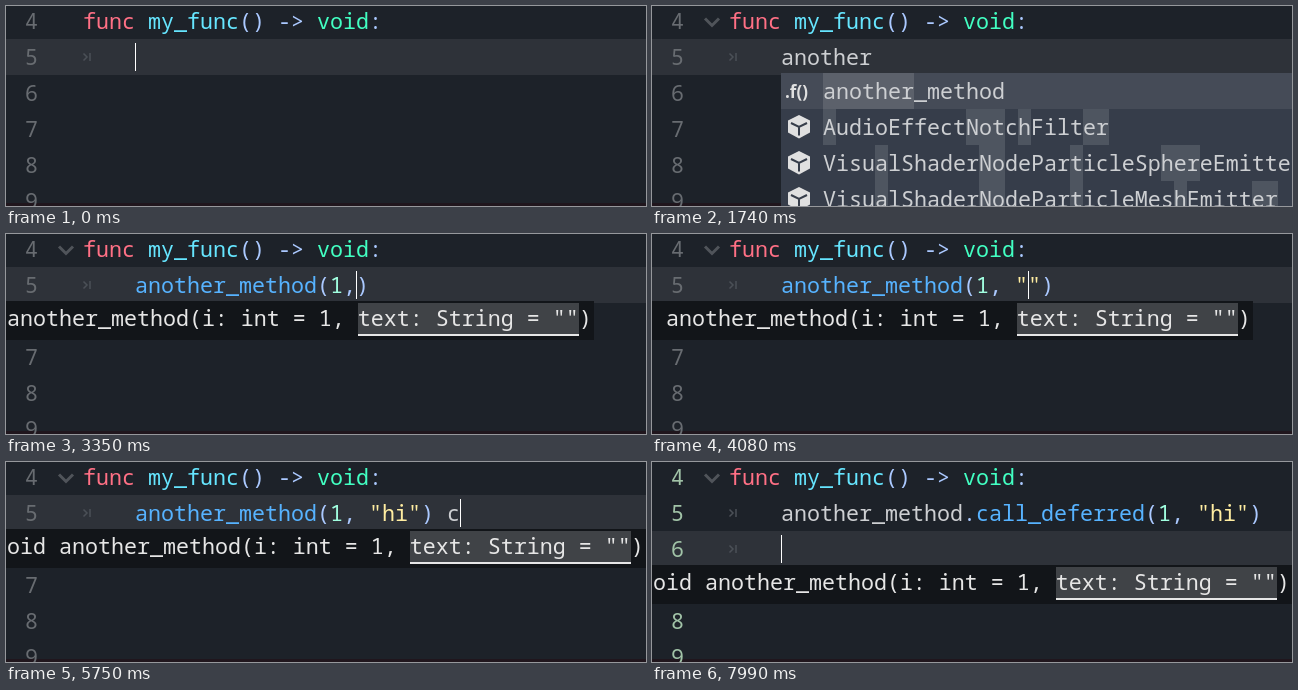
Animation of 640x200 px, one loop 8.12 s. Source, as an HTML page:

```html
<!DOCTYPE html>
<html lang="en">
<head>
<meta charset="utf-8">
<title>Deferred call</title>
<style>
html, body { margin: 0; width: 100%; height: 100%; overflow: hidden; background: #1d2229; }
svg { display: block; }
text { font: 21.667px "Noto Sans Mono", "DejaVu Sans Mono", monospace; white-space: pre; }
</style>
</head>
<body>
<svg id="stage" width="640" height="200" viewBox="0 0 640 200"></svg>
<script>
const LOOP = 8120, CHAR = 13, ROW = 36, CODE_X = 77, BODY_X = 129;
const PLAIN = '#cdcfd2', SYMBOL = '#abc9ff';
const CALL = 'another_method(';
const SIGNATURE = 'void ' + CALL + 'i: int = 1, text: String = "")';
const ARGS = [[20, 10], [32, 17]]; // start column and length in the signature

// Completion entries with the [column, length] of each matched run
const OPTIONS = [
  ['another_method', [[0, 7]]],
  ['AudioEffectNotchFilter', [[0, 1], [11, 3], [15, 1], [20, 2]]],
  ['VisualShaderNodeParticleSphereEmitter', [[4, 1], [12, 2], [19, 1], [26, 3]]],
  ['VisualShaderNodeParticleMeshEmitter', [[4, 1], [12, 2], [19, 1], [27, 1], [33, 2]]]
];

const start = { code: '', col: 0, line: 5, caret: true, hint: null, arg: 0,
                list: false, fold: false, match: false, safe: false };
const type = (code, col = code.length, more = {}) => ({ code, col, caret: true, ...more });
const on = { caret: true }, off = { caret: false };

const steps = [
  [0, {}],
  [530, type('a', 1, { fold: true })], [600, type('an')], [680, type('ano')],
  [820, type('anot')], [950, type('anoth')], [1080, type('anothe')], [1280, type('another')],
  [1610, { list: true }], [1740, off],
  [2140, { code: CALL + ')', col: 15, list: false, hint: 66 }],
  [2260, on], [2730, off],
  [2860, type(CALL + '1)', 16)], [2990, type(CALL + '1,)', 17)],
  [3350, { hint: -64, arg: 1 }], [3480, off],
  [3750, type(CALL + '1, )', 18)], [3820, { hint: -51 }],
  [4080, type(CALL + '1, "")', 19)],
  [4170, type(CALL + '1, "h")', 20, { hint: -38 })],
  [4270, type(CALL + '1, "hi")', 21)],
  [4610, { hint: -12 }], [4810, off],
  [5010, { col: 22, caret: true }], [5140, { col: 23, match: true }],
  [5620, type(CALL + '1, "hi") ', 24, { match: false })],
  [5720, type(CALL + '1, "hi") c')], [5810, type(CALL + '1, "hi") cd')],
  [6010, { line: 6, col: 0 }],
  [6340, { code: 'another_method.call_deferred(1, "hi")', caret: false }],
  [6800, on], [7330, off], [7790, on],
  [7990, { safe: true }]
];

const rect = (x, y, w, h, fill) => `<rect x="${x}" y="${y}" width="${w}" height="${h}" fill="${fill}"/>`;
const text = (x, y, s, fill) => `<text x="${x}" y="${y}" fill="${fill}">${s}</text>`;
const stroke = (d, color, w) => `<path d="${d}" fill="none" stroke="${color}" stroke-width="${w}"/>`;
const rowTop = n => (n - 4) * ROW - 3;

function tokenColor(word, before, after) {
  if (word[0] === '"') return '#ffeda1';
  if (/^\d/.test(word)) return '#a1ffe0';
  if (!/^\w/.test(word)) return SYMBOL;
  if (word === 'func') return '#ff7085';
  if (word === 'void') return '#42ffc2';
  if (after[0] !== '(') return PLAIN;
  return before.endsWith('func ') ? '#66e6ff' : '#57b3ff';
}

function codeLine(x, line, src) {
  let out = '';
  for (const m of src.matchAll(/"[^"]*"|\w+|[^\w\s"]+/g)) {
    const before = src.slice(0, m.index), after = src.slice(m.index + m[0].length);
    out += text(x + m.index * CHAR, rowTop(line) + 26, m[0], tokenColor(m[0], before, after));
  }
  return out;
}

const tabMark = line => stroke(`M77.5 ${rowTop(line) + 14.5}l3.5 3.5-3.5 3.5m6.5-7.5v8`, '#4b5057', 1.5);

function cube(y) {
  return `<path d="M147 ${y - 12}l11 5.5v12l-11 6-11-6v-12z" fill="#e0e0e0"/>` +
    stroke(`M139 ${y - 4}l8 4 8-4M147 ${y}v8.5`, '#363d4a', 2);
}

function completion() {
  let out = rect(BODY_X, 67, 511, 133, '#363d4a') + rect(BODY_X, 67, 511, ROW, '#454b57');
  OPTIONS.forEach(([name, runs], i) => {
    const y = 67 + i * ROW;
    for (const [col, n] of runs) out += rect(171 + col * CHAR, y, n * CHAR, ROW, '#ffffff1f');
    out += text(171, y + 26, name, PLAIN);
    out += i ? cube(y + 18)
      : `<text x="133" y="${y + 25}" fill="#e0e0e0" style="font:bold 17px 'Noto Sans',sans-serif">.f()</text>`;
  });
  return out;
}

function signature(x, line, arg) {
  const y = rowTop(line) + 34, [col, n] = ARGS[arg];
  const ax = x + col * CHAR, w = n * CHAR;
  return rect(x - 2, y, SIGNATURE.length * CHAR + 4, 39, '#121519') +
    rect(ax, y + 2, w, 33, '#404347') + rect(ax, y + 33, w, 2, '#e6e6e6') +
    text(x, y + 25, SIGNATURE, '#e6e6e6');
}

function render(s) {
  let out = rect(0, 197, 640, 3, '#20161d') + rect(0, rowTop(s.line), 640, ROW, '#2e3239');
  for (let n = 4; n <= 9; n++) out += text(19, rowTop(n) + 26, n, s.safe ? '#a1c3a7' : '#686c71');
  out += codeLine(CODE_X, 4, 'func my_func() -> void:') + codeLine(BODY_X, 5, s.code);
  for (let n = 5; n <= s.line; n++) out += tabMark(n);
  if (s.fold) out += stroke('M53 12.5l7 7 7-7', '#50545a', 3);
  if (s.match) for (const col of [14, 22]) out += rect(BODY_X + col * CHAR, 62, CHAR, 1, SYMBOL);
  if (s.caret) out += rect(BODY_X + s.col * CHAR, rowTop(s.line) + 4, 1, 28, '#fff');
  if (s.list) out += completion();
  if (s.hint !== null) out += signature(s.hint, s.line, s.arg);
  return out;
}

const stage = document.getElementById('stage');
let shown = 0;

function frame() {
  const t = performance.now() % LOOP;
  const count = steps.filter(([at]) => at <= t).length;
  if (count !== shown) {
    shown = count;
    stage.innerHTML = render(Object.assign({}, start, ...steps.slice(0, count).map(step => step[1])));
  }
  requestAnimationFrame(frame);
}
frame();
</script>
</body>
</html>
```
